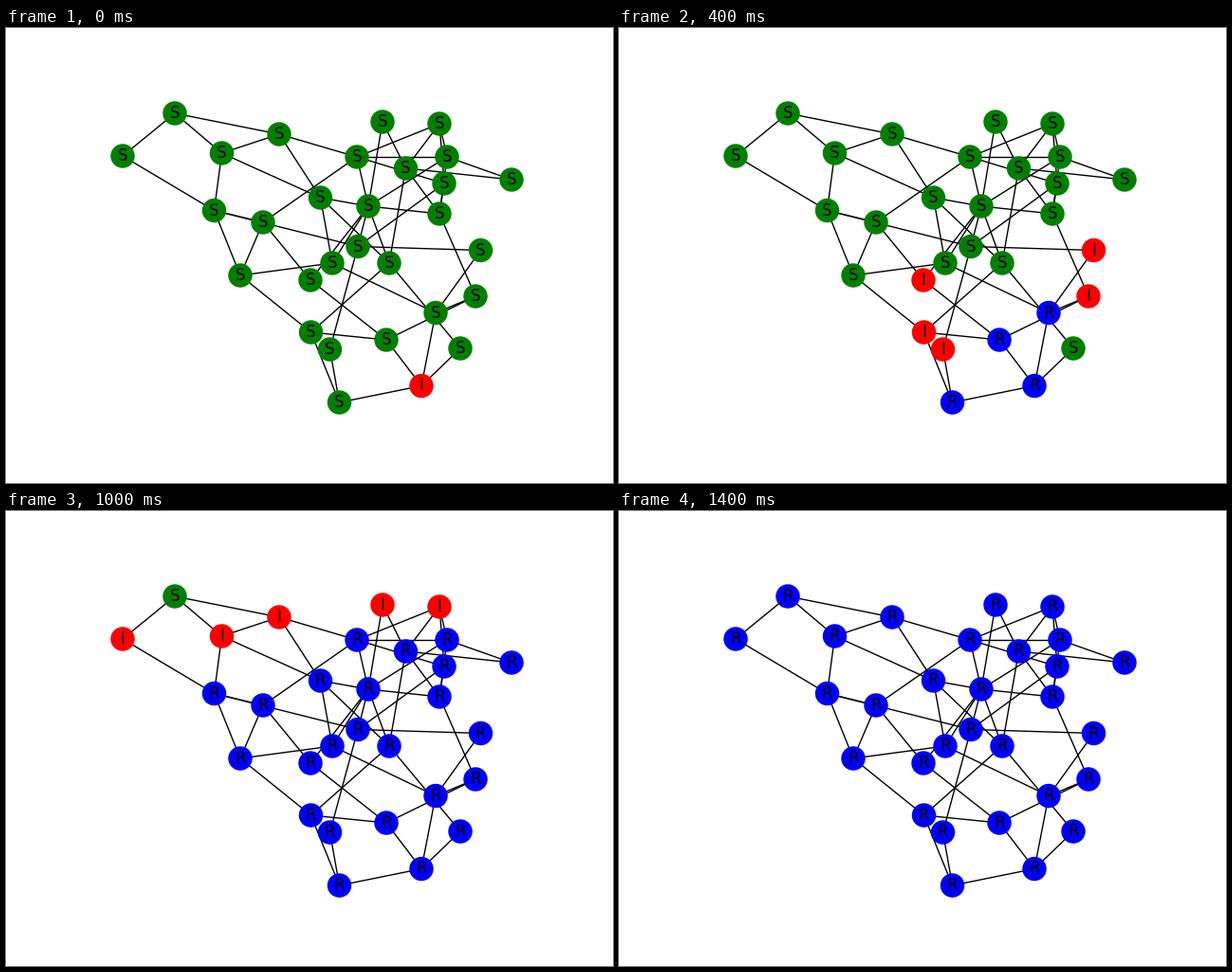
Animation of 640 by 480 pixels, one loop 1600 ms. Source, as a matplotlib script:

```python
import matplotlib.pyplot as plt
from matplotlib.animation import FuncAnimation
from matplotlib.collections import LineCollection

WIDTH, HEIGHT, DPI = 640, 480, 100
STEPS, INTERVAL = 8, 200
COLORS = {"S": "green", "I": "red", "R": "blue"}

# Each wave holds the nodes that become infected at that step.
WAVES = [
    {"h": (438, 377.5)},
    {"b": (453, 300.5), "e": (401, 329), "g": (351.5, 395)},
    {"Z": (500.5, 234.5), "X": (321, 266), "a": (495, 283),
     "c": (321.5, 321), "d": (341.5, 339)},
    {"L": (533, 160), "M": (457, 196), "Q": (271, 205),
     "U": (371, 230.5), "V": (404, 248), "Y": (247, 261)},
    {"E": (370, 136), "H": (465, 136), "J": (421.5, 148),
     "K": (462, 164), "N": (331.5, 179), "O": (382, 188),
     "P": (219.5, 192.5), "W": (344, 248), "f": (479, 338)},
    {"A": (123, 135), "C": (227.5, 132), "D": (288, 112),
     "F": (397, 99), "G": (457, 101)},
    {"B": (178, 90)},
]

EDGES = """
AB AP BC BD CD CP CN DE DN EQ EO EH EK EG FO FJ GJ GH GK HL HO HM
JL JM JV KM KU OM ON NW NV OV OU OW OX PQ PU PY QY QX UZ Ud
Vf Vc WY Wb Xe Yc Zb aM ab ae ce cg dg gh eh bh fh
""".split()

nodes = {name: xy for wave in WAVES for name, xy in wave.items()}
infected_at = [step for step, wave in enumerate(WAVES) for _ in wave]


def state(start, step):
    if step < start:
        return "S"
    return "I" if step == start else "R"


fig = plt.figure(figsize=(WIDTH / DPI, HEIGHT / DPI), dpi=DPI, facecolor="white")
ax = fig.add_axes([0, 0, 1, 1])
ax.set_xlim(0, WIDTH)
ax.set_ylim(HEIGHT, 0)
ax.axis("off")

ax.add_collection(LineCollection(
    [(nodes[u], nodes[v]) for u, v in EDGES],
    colors="black", linewidths=1, zorder=1))
xs, ys = zip(*nodes.values())
discs = ax.scatter(xs, ys, s=300, c=[COLORS["S"]] * len(nodes),
                   linewidths=1, zorder=2)
labels = [ax.text(x, y, "S", fontsize=12, family="DejaVu Sans", color="black",
                  ha="center", va="center", zorder=3)
          for x, y in nodes.values()]


def draw(step):
    states = [state(start, step) for start in infected_at]
    colors = [COLORS[s] for s in states]
    discs.set_facecolor(colors)
    discs.set_edgecolor(colors)
    for label, s in zip(labels, states):
        label.set_text(s)
    return [discs, *labels]


animation = FuncAnimation(fig, draw, frames=STEPS, interval=INTERVAL,
                          repeat=True, repeat_delay=0, blit=False)
plt.show()
```
